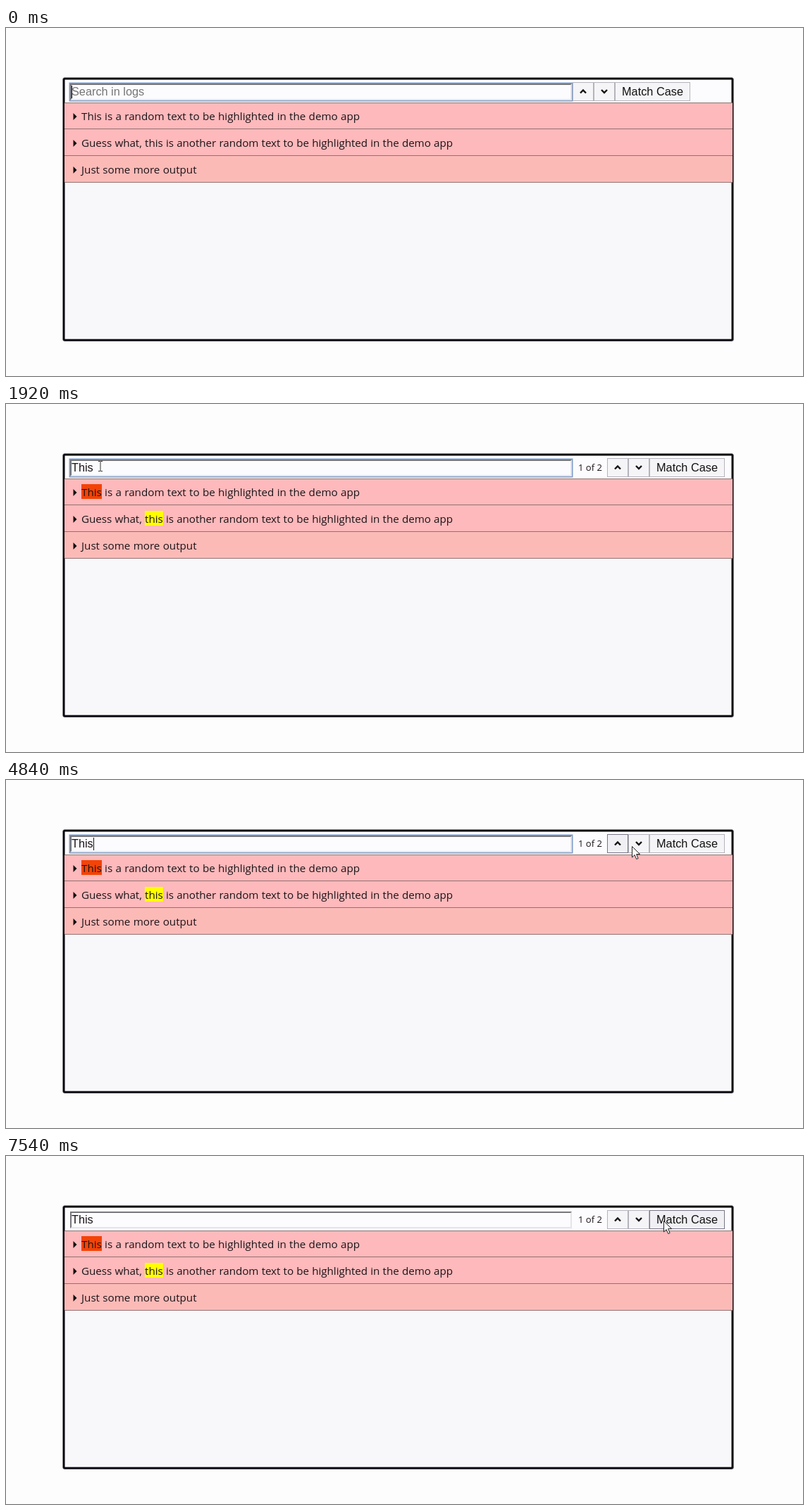
Write an HTML page that moves like this. It is 1131 px wide and 495 px high and loops after 8 s.

```html
<!DOCTYPE html>
<html lang="en">
<head>
<meta charset="utf-8">
<title>Log search</title>
<style>
  html, body { margin: 0; width: 100%; height: 100%; overflow: hidden; background: #fdfdfd; }
  body { position: relative; font: 15.2px "Open Sans", "Noto Sans", sans-serif; color: #1c1418; }
  div, svg, button { position: absolute; box-sizing: border-box; white-space: pre; }
  #panel { left: 81px; top: 71px; width: 951px; height: 374px; border: 2px solid #05050c; border-radius: 2px; box-shadow: 0 0 0 .5px #05050c, inset 0 0 0 .5px #05050c; background: linear-gradient(#fcfcfe 33px, #f8f8fa 33px); }
  #field, button { font: 16.3px "Liberation Sans", Arial, sans-serif; }
  #field { left: 91px; top: 79px; width: 712px; height: 24px; border: 2px solid; border-color: #77777c #e4e4ea #e4e4ea #77777c; background: #fcfcfe; line-height: 19px; }
  #field.focus { box-shadow: 0 0 0 1.5px #7c9cc9; }
  #field.empty { color: #757575; }
  #caret { left: 0; top: 1px; width: 1px; height: 18px; background: #111; }
  #count { left: 812px; top: 78px; font-size: 13px; line-height: 25px; }
  button { top: 77px; height: 27px; width: 30px; padding: 0; border: 1px solid #b4b4bc; background: #f5f5f8; color: #111; line-height: 25px; }
  button.hover { border-color: #777788; background: #f0f0f4; }
  button svg { left: 8px; top: 7px; }
  .row { left: 83px; width: 948px; height: 38px; padding-left: 24px; line-height: 38px; word-spacing: .36px; background: #fdb9bb; border-bottom: 1px solid #96706f; }
  .row:nth-of-type(2) { letter-spacing: -.05px; }
  .row:nth-of-type(3) { background: #fcbab7; }
  .row svg { left: 12px; top: 15px; }
  #rule { left: 83px; top: 106px; width: 948px; height: 1px; background: #96706f; }
  mark { padding-top: 1px; background: #ff0; color: inherit; }
  mark.current { background: #f44306; }
</style>
</head>
<body>
<div id="panel"></div>
<div id="field"><span id="query"></span><div id="caret"></div></div>
<div id="count"></div>
<button><svg width="12" height="10"><path d="M2 7.5 6 3.5 10 7.5" fill="none" stroke="#111" stroke-width="2.4"/></svg></button>
<button><svg width="12" height="10"><path d="M2 3 6 7 10 3" fill="none" stroke="#111" stroke-width="2.4"/></svg></button>
<button style="width:107px">Match Case</button>
<section id="rows"></section>
<div id="rule"></div>
<svg id="beam" width="10" height="17"><path d="M2 1.5H4.5L5 2 5.5 1.5H8M5 2V15M2 15.5H4.5L5 15 5.5 15.5H8" fill="none" stroke="#333"/></svg>
<svg id="arrow" width="15" height="21"><path d="M.5.5V16l3.6-3.5 2.6 6 2.4-1-2.5-5.9h5z" fill="#fff" stroke="#222"/></svg>
<script>
const $ = id => document.getElementById(id);
const lines = [
  'This is a random text to be highlighted in the demo app',
  'Guess what, this is another random text to be highlighted in the demo app',
  'Just some more output'
];
const LOOP = 8000, BLUR = 5010;
const keyTimes = [800, 1040, 1200, 1355];
const clicks = [5020, 5545, 6020, 6340];
// Pointer path: time, x, y
const path = [
  [250, 134, 88], [2340, 134, 88], [2500, 160, 80], [2700, 400, 62], [2900, 720, 60],
  [3130, 862, 88], [3420, 866, 92], [4670, 866, 92], [4840, 888, 94], [5000, 895, 91],
  [6340, 895, 91], [6590, 914, 102], [7040, 930, 98], [7380, 930, 98], [7540, 933, 92]
];
const buttons = [...document.querySelectorAll('button')];
const passed = (times, t) => times.filter(k => t >= k).length;

const texts = lines.map((line, i) => {
  const row = document.createElement('div');
  row.className = 'row';
  row.style.top = 106 + 38 * i + 'px';
  row.innerHTML = '<svg width="6" height="11"><path d="M.5 0 5.5 5 .5 10z" fill="#111"/></svg><span></span>';
  $('rows').append(row);
  return row.lastChild;
});

let shown = '';
function showSearch(query, current) {
  const key = query + current;
  if (key === shown) return;
  shown = key;
  let total = 0;
  lines.forEach((line, i) => {
    texts[i].innerHTML = !query ? line : line.replace(new RegExp(query, 'gi'), hit =>
      `<mark${total++ === current ? ' class="current"' : ''}>${hit}</mark>`);
  });
  $('query').textContent = query || 'Search in logs';
  $('field').classList.toggle('empty', !query);
  $('count').textContent = query ? `${current + 1} of ${total}` : '';
  const shift = !query ? 0 : total > 9 ? 56 : 49;
  buttons.forEach((b, i) => b.style.left = 804 + shift + 30 * i + 'px');
  $('caret').style.left = (query ? $('query').offsetWidth : 0) + 'px';
}

function pointerAt(t) {
  const next = path.findIndex(p => p[0] > t);
  if (next < 1) return path[next < 0 ? path.length - 1 : 0].slice(1);
  const [t0, x0, y0] = path[next - 1], [t1, x1, y1] = path[next];
  const k = (t - t0) / (t1 - t0);
  return [x0 + (x1 - x0) * k, y0 + (y1 - y0) * k];
}

function caretOn(t) {
  if (t >= BLUR) return false;
  if (t < keyTimes[0]) return t < 460;
  return t < keyTimes[3] || (t - keyTimes[3]) % 1030 < 515;
}

function place(el, visible, x, y) {
  el.style.visibility = visible ? 'visible' : 'hidden';
  el.style.transform = `translate(${Math.round(x)}px, ${Math.round(y)}px)`;
}

function frame() {
  const t = performance.now() % LOOP;
  showSearch('This'.slice(0, passed(keyTimes, t)), passed(clicks, t) % 2);
  $('field').classList.toggle('focus', t < BLUR);
  $('caret').style.visibility = caretOn(t) ? 'visible' : 'hidden';

  const hovered = passed([3130, 4860, 6610], t) - 1;
  buttons.forEach((b, i) => b.classList.toggle('hover', i === hovered));

  const [x, y] = pointerAt(t), overField = x < 804 && y > 76;
  place($('beam'), t >= 250 && overField, x - 5, y - 8);
  place($('arrow'), t >= 250 && !overField, x, y);
  requestAnimationFrame(frame);
}
$('beam').style.left = $('beam').style.top = $('arrow').style.left = $('arrow').style.top = 0;
frame();
</script>
</body>
</html>
```
